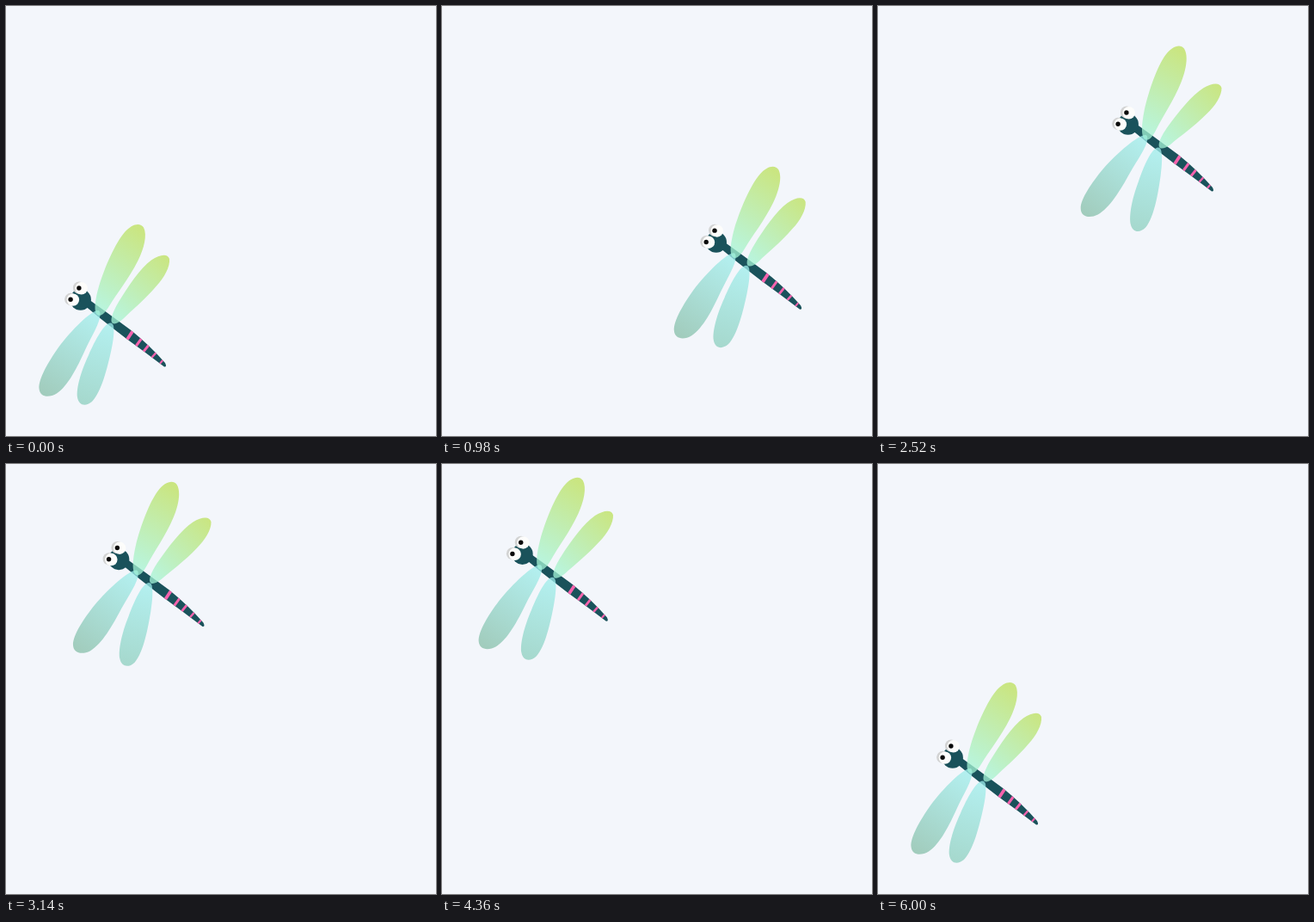
An HTML page for the animation above (6020 ms loop, 500 by 500 pixels).

```html
<!DOCTYPE html>
<html lang="en">
<head>
<meta charset="utf-8">
<title>Dragonfly</title>
<style>
  html, body { margin: 0; width: 100%; height: 100%; overflow: hidden; background: #f3f6fb; }
  svg { display: block; width: 100vw; height: 100vh; }
  .wing { opacity: .75; }
</style>
</head>
<body>
<svg viewBox="0 0 500 500">
  <defs>
    <linearGradient id="lime" gradientUnits="userSpaceOnUse" x1="108" y1="358" x2="168" y2="268">
      <stop offset="0" stop-color="#a4f5da"/><stop offset="1" stop-color="#bce059"/>
    </linearGradient>
    <linearGradient id="lime2" gradientUnits="userSpaceOnUse" x1="124" y1="368" x2="188" y2="292">
      <stop offset="0" stop-color="#a4f5da"/><stop offset="1" stop-color="#bce059"/>
    </linearGradient>
    <linearGradient id="aqua" gradientUnits="userSpaceOnUse" x1="106" y1="358" x2="46" y2="452">
      <stop offset="0" stop-color="#9eeeec"/><stop offset="1" stop-color="#86bea8"/>
    </linearGradient>
    <linearGradient id="aqua2" gradientUnits="userSpaceOnUse" x1="122" y1="370" x2="86" y2="472">
      <stop offset="0" stop-color="#9eeeec"/><stop offset="1" stop-color="#8acbb9"/>
    </linearGradient>
    <path id="torso" d="M96 341L114 354L145 376.800Q167 394.500 185 415Q187.500 420 184 419.500Q161 402 139.500 386.500L124 374.500L110 363.500L91 348Z"/>
    <clipPath id="trim"><use href="#torso"/></clipPath>
    <g id="eye">
      <circle cx=".1" r="7.200" fill="#d2d3d3"/>
      <circle cx="2.700" cy=".6" r="7.200" fill="#fdfdfb"/>
      <circle cx="-.1" cy=".3" r="2.700" fill="#0b0b0b"/>
    </g>
  </defs>
  <g id="fly">
    <use href="#torso" fill="#1a525b"/>
    <g clip-path="url(#trim)" stroke="#f663ad">
      <path stroke-width="3.800" d="M148 377L140 389"/>
      <path stroke-width="3" d="M158 386L150 397"/>
      <path stroke-width="2.900" d="M167 393L159 403"/>
      <path stroke-width="2.500" d="M175.500 402L167.500 411"/>
      <path stroke-width="2.100" d="M184 410L177 418"/>
    </g>
    <circle cx="86.700" cy="341.500" r="12.200" fill="#1a525b"/>
    <use href="#eye" x="85" y="327.700"/>
    <use href="#eye" x="75.200" y="341"/>
    <path class="wing" fill="url(#aqua)" d="M107 354C99 354 76 377 61 397C49 414 37.500 434 38.500 445C39.500 455 50 456 59 450.500C72 442 83 420 92 400C100 383 109 369 109.500 359Q109.500 354 107 354Z"/>
    <path class="wing" fill="url(#aqua2)" d="M121.500 368.500C114 369 104 388 96 406C87 425 81.500 445 83 455C84.500 465 93 466 100 460C111 449 118 420 122 402C125 388 126 379 125 372Q124 368.500 121.500 368.500Z"/>
    <path class="wing" fill="url(#lime)" d="M107 359.500C101 357 104 340 108 326C115 303 127.500 275 138 263C146 253.500 156 251 160 257.500C164.500 266 160.500 282 153.500 296C143 317 129 334 120 349C115 357 111 361 107 359.500Z"/>
    <path class="wing" fill="url(#lime2)" d="M124 369C120 366 125 354 131 344C142 326 156 305 169 295.500C179 288.500 188 287.500 190 294C191 303 184 316 175 325.500C161 342 146 354 136 364Q128 371 124 369Z"/>
  </g>
</svg>
<script>
const LOOP = 6020, BEAT = 200, SPREAD = 5;
const fly = document.getElementById("fly");
const wings = document.querySelectorAll(".wing");
// pivot x, pivot y, turn direction
const hinges = [[106, 356, 1], [123, 370, -1], [106, 357, -1], [125, 367, 1]];
// start, duration, target x, target y
const flights = [
  [50, 1200, 232.7, -67],
  [1300, 1200, 204, -204],
  [2530, 1800, 6.8, -236.8],
  [4510, 600, 0, 0]
];
const easeOut = p => 1 - (1 - p) ** 4;

function place(t) {
  let x = 0, y = 0;
  for (const [start, length, toX, toY] of flights) {
    const k = easeOut(Math.min(1, Math.max(0, (t - start) / length)));
    x += (toX - x) * k;
    y += (toY - y) * k;
  }
  return [x, y];
}

function draw(now) {
  const t = now % LOOP;
  fly.setAttribute("transform", `translate(${place(t)})`);
  const angle = SPREAD * (1 - Math.cos(2 * Math.PI * t / BEAT)) / 2;
  hinges.forEach(([x, y, side], i) =>
    wings[i].setAttribute("transform", `rotate(${angle * side} ${x} ${y})`));
}

let begin;
function tick(now) {
  begin ??= now;
  draw(now - begin);
  requestAnimationFrame(tick);
}
draw(0);
requestAnimationFrame(tick);
</script>
</body>
</html>
```
